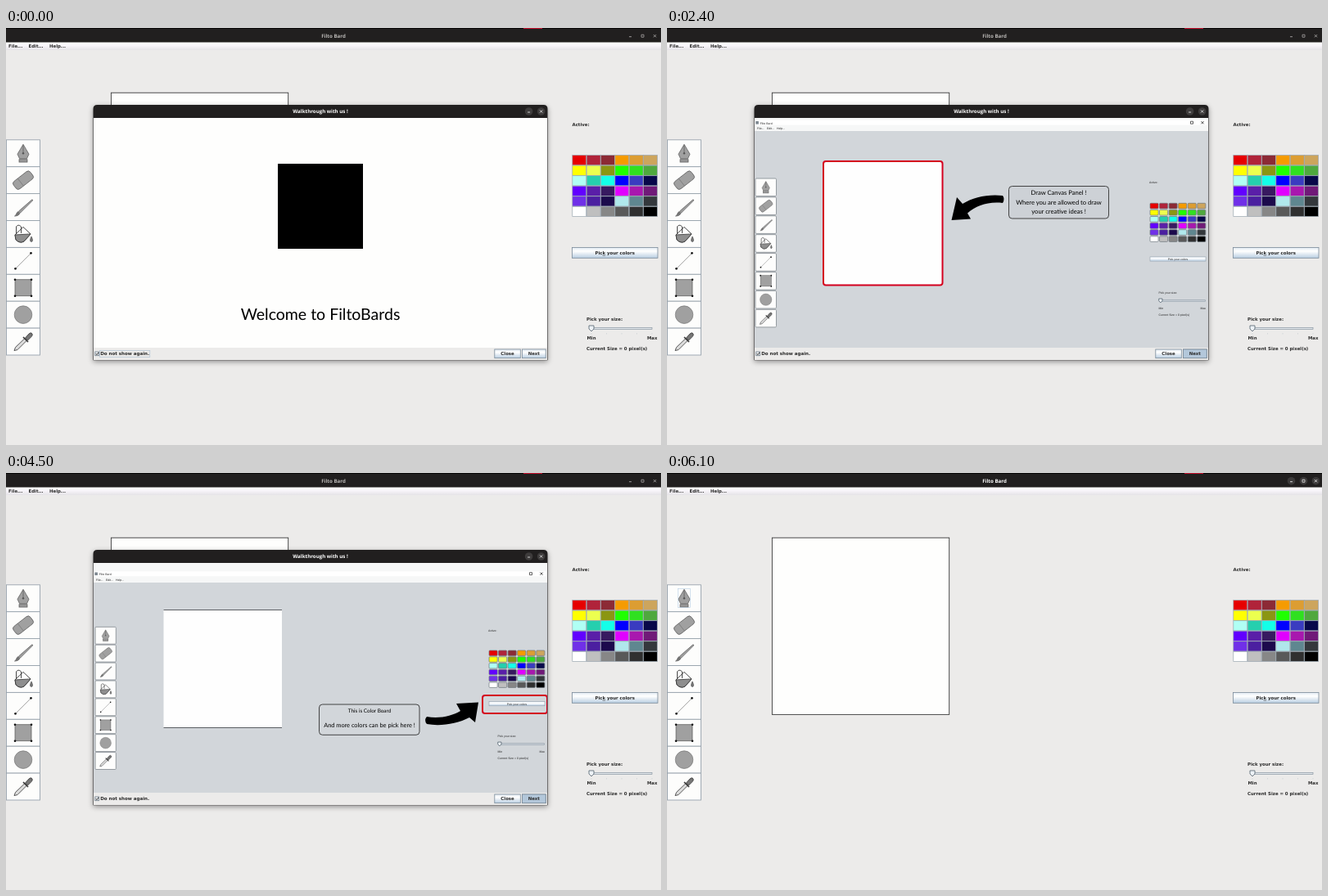
An HTML page for the animation above (7500 ms loop, 800x510 px).

```html
<!DOCTYPE html>
<html lang="en">
<head>
<meta charset="utf-8">
<title>Walkthrough</title>
<style>
html, body { margin: 0; width: 100%; height: 100%; overflow: hidden; background: #ecebea; }
svg { display: block; width: 800px; height: 510px; text-rendering: geometricPrecision; }
.ui { font: bold 5.4px "DejaVu Sans", sans-serif; fill: #2b2b2b; }
.bar { font: bold 6.15px "Open Sans", "Noto Sans", sans-serif; }
.small { font: 3.5px "Liberation Sans", Arial, sans-serif; fill: #222; }
.note { font: 7.6px Lato, sans-serif; fill: #000; text-anchor: middle; }
.big { font: 19.5px Lato, sans-serif; fill: #000; text-anchor: middle; }
.mid { text-anchor: middle; }
.mark { fill: none; stroke: #d4001e; stroke-width: 2; }

/* every part shares one 7.5 s clock */
.t { animation: 7.5s step-end infinite; }
.welcome { animation-name: welcome; }
.canvas { animation-name: canvas; }
.colors { animation-name: colors; }
.edit { animation-name: edit; }
.enjoy { animation-name: enjoy; }
.pressed { animation-name: pressed; }
.idle { animation-name: idle; }
.active { animation-name: active; }
#dialog { animation: close 7.5s linear infinite; transform-origin: 384px 250px; filter: drop-shadow(0 2px 3px rgba(0,0,0,.4)); }
@keyframes welcome { 0% { visibility: visible } 30.667%, 100% { visibility: hidden } }
@keyframes canvas { 0% { visibility: hidden } 30.667% { visibility: visible } 44%, 100% { visibility: hidden } }
@keyframes colors { 0% { visibility: hidden } 44% { visibility: visible } 64%, 100% { visibility: hidden } }
@keyframes edit { 0% { visibility: hidden } 64% { visibility: visible } 73.333%, 100% { visibility: hidden } }
@keyframes enjoy { 0% { visibility: hidden } 73.333%, 100% { visibility: visible } }
@keyframes pressed { 0% { visibility: hidden } 30.667% { visibility: visible } 64%, 100% { visibility: hidden } }
@keyframes idle { 0% { visibility: visible } 78.667%, 100% { visibility: hidden } }
@keyframes active { 0% { visibility: hidden } 78.667%, 100% { visibility: visible } }
@keyframes close {
  0%, 78.667% { transform: scale(1); opacity: 1; animation-timing-function: ease-out; }
  81.2%, 100% { transform: scale(.8); opacity: 0; }
}
</style>
</head>
<body>
<svg id="stage" viewBox="0 0 800 510"></svg>
<script>
const APP = 'Filto Bard';
const PALETTE = [
  'e60000 b0233a 8c2a35 f59b00 dc9d32 cda55d',
  'ffff00 ecff4f 8b9612 1fff00 30e020 4fa83e',
  'b0fff4 26cfae 14ffe8 0000ff 3a3cc0 08084a',
  '6200ff 5a1fa8 381a60 e000ff a818ae 701a78',
  '7030e8 4b1fa0 1c0a4c b0e8ec 5f8790 34383c',
  'ffffff bfbfbf 878787 595959 303030 000000'
].map(row => row.split(' '));

const rect = (x, y, w, h, fill, more = '') =>
  `<rect x="${x}" y="${y}" width="${w}" height="${h}" fill="${fill}" ${more}/>`;
const text = (x, y, str, cls = 'ui', more = '') =>
  `<text x="${x}" y="${y}" class="${cls}" ${more}>${str}</text>`;
const line = (d, stroke, w = 1) =>
  `<path d="${d}" fill="none" stroke="${stroke}" stroke-width="${w}"/>`;
const shape = (d, fill = '#000', more = '') => `<path d="${d}" fill="${fill}" ${more}/>`;
const timed = (name, body) => `<g class="t ${name}">${body}</g>`;
const dot = (x, y, r, fill = '#111') => `<circle cx="${x}" cy="${y}" r="${r}" fill="${fill}"/>`;
const box = 'stroke="#7a8a99" stroke-width=".8"';

// tool icons, drawn around their own centre
const ink = 'stroke="#555" stroke-width=".7"';
const ICONS = [
  shape('M0-11C2-7 5-3 7 1L4.5 6.500h-9L-7 1C-5-3-2-7 0-11Z', '#a0a0a0', ink) +
    rect(-5, 7.5, 10, 3.3, '#9a9a9a', ink) + line('M0-10V-1', '#555', .7) + dot(0, 0, 1.2, '#555'),
  `<g transform="rotate(-38)">${rect(-13, -5.8, 26, 11.6, '#a0a0a0', 'rx="3.5" ' + ink)}${line('M-4-5.800V5.800', '#777', .7)}</g>`,
  shape('M-10.500 11C-8 10-9 7-6 5.500L-4 7.500C-5 10-8 11-10.500 11Z', '#777', ink) +
    shape('M-5.500 5L10.500-9Q12-9.500 11.500-8L-3.500 7Z', '#a0a0a0', ink),
  shape('M-10 1L0-8.500L9 0L1 9Q-4 12-9 7Z', '#fff', 'stroke="#333" stroke-width=".9"') +
    shape('M-10 1L9 0L1 9Q-4 12-9 7Z', '#8e8e8e', 'stroke="#333" stroke-width=".8"') +
    line('M-8.500 0V-9Q-6-12.500-2.500-9V-1', '#333', .9) + shape('M10 3Q13 9 10 9.500Q7 9 10 3Z', '#777', ink),
  line('M-9.500 9.500L9.500-9.500', '#777', .7) + dot(-9.5, 9.5, 1.3) + dot(9.5, -9.5, 1.3),
  rect(-10, -10, 20, 20, '#a0a0a0', ink) +
    [[-10, -10], [10, -10], [-10, 10], [10, 10]].map(([x, y]) => dot(x, y, 1.3)).join(''),
  `<circle r="10.8" fill="#a0a0a0" stroke="#777" stroke-width=".7"/>`,
  shape('M-11 11L-9.500 7L2-4L4.500-1.500L-7 10Z', '#ddd', 'stroke="#333" stroke-width=".8"') +
    line('M0-5.500L6 .5', '#333', 1.6) +
    shape('M2.500-4.500L7-9.500Q9.500-12 11-9.500Q12-8 10-6L5.500-1.500Z', '#777', 'stroke="#333" stroke-width=".8"')
];

const tools = (x, y, w, h, gap, scale, stroke) => ICONS.map((icon, i) =>
  rect(x, y + i * h, w, h - gap, '#fdfdfc', `stroke="${stroke}" stroke-width=".9" rx="${gap}"`) +
  `<g transform="translate(${x + w / 2} ${y + i * h + (h - gap) / 2}) scale(${scale})">${icon}</g>`).join('');

const swatches = (x, y, dx, dy, gap, rx, stroke) => PALETTE.map((row, r) => row.map((c, i) =>
  rect(x + i * dx, y + r * dy, dx - gap, dy - gap, '#' + c, `rx="${rx}" stroke="${stroke}" stroke-width=".7"`)
).join('')).join('');

const slider = (x, y, w, s) =>
  rect(x, y - s, w, 2 * s, '#e4e8ec', 'stroke="#8795a2" stroke-width=".7"') +
  shape(`M${x - 2.5 * s} ${y - 3.5 * s}h${6 * s}v${4 * s}l${-3 * s} ${3 * s}l${-3 * s} ${-3 * s}Z`,
    '#edf2f6', 'stroke="#51606d" stroke-width=".8"');

const button = (x, y, w, h, label, cls = 'ui') =>
  rect(x, y, w, h, 'url(#metal)', box) + text(x + w / 2, y + h / 2 + 2, label, cls + ' mid');

const winButtons = (xs, y, color, disc) => xs.map(([x, kind]) =>
  (disc ? dot(x, y, 4.8, disc) : '') + {
    min: line(`M${x - 1.5} ${y + 1}h3`, color, .8),
    max: line(`M${x - 1.5} ${y - 1.5}h3v3h-3Z`, color, .7),
    x: line(`M${x - 1.6} ${y - 1.6}l3.2 3.2m0-3.2l-3.2 3.2`, color, .8)
  }[kind]).join('');

function mainWindow() {
  const buttons = [[762.5, 'min'], [777.5, 'max'], [792.5, 'x']];
  const title = (color, disc) =>
    text(400, 12, APP, 'bar mid', `fill="${color}"`) + winButtons(buttons, 9.7, color, disc);
  return rect(0, 0, 800, 510, '#ecebea') +
    rect(0, 0, 800, 17.7, '#211f1f') + rect(0, 0, 800, 1, '#060606') + rect(632, 0, 23, 1, '#c8102e') +
    timed('idle', title('#b9b7b5', '')) + timed('active', title('#fff', '#3c3a3a')) +
    rect(0, 17.7, 800, 9.3, 'url(#menu)') +
    text(3, 23.8, 'File...') + text(27.5, 23.8, 'Edit...') + text(53, 23.8, 'Help...') +
    rect(128.4, 79.2, 216.3, 216.2, '#fefefd', 'stroke="#3a3a3a" stroke-width=".9"') +
    tools(.5, 136.8, 41, 32.9, 0, 1, '#98a3ad') +
    timed('active', rect(13.5, 141.5, 15, 23, 'none', 'stroke="#b8cfe5" stroke-width=".6"')) +
    text(691.5, 119.5, 'Active:') +
    swatches(691.8, 155.6, 17.35, 12.55, .4, 0, '#9aa6b0') +
    button(691.5, 268.5, 104.5, 12.8, 'Pic<tspan text-decoration="underline">k</tspan> your colors') +
    text(709, 357.5, 'Pick your size:') + slider(714.5, 367.5, 74.5, 1) +
    line('M715 373v1.500m18.500-1.500v1.500m18.500-1.500v1.500m18.500-1.500v1.500m18.500-1.500v1.500', '#c3c9ce', .6) +
    text(709.5, 381.2, 'Min') + text(783, 381.2, 'Max') +
    text(709, 394, 'Current Size = 0 pixel(s)');
}

// small picture of the program used inside the walkthrough pages
function mini(o) {
  return rect(107, 110, 554, 281, o.bg) +
    rect(107, 110, 554, o.head, '#f6f7f7') + rect(107, o.top - 3, 554, 6, '#fff') +
    rect(108.3, o.top - 1.7, 3.6, 3.6, '#7d8790') +
    text(113.7, o.top + 1.8, APP, 'small') +
    ['File...', 'Edit...', 'Help...'].map((m, i) => text(110 + 12 * i, o.top + 8.6, m, 'small')).join('') +
    winButtons(o.buttons, o.top, '#222') +
    rect(...o.paper, '#fefefe') +
    tools(...o.tools) + swatches(...o.palette) +
    text(589, o.active, 'Active:', 'small') +
    rect(590, o.pick - 2.6, 68, 5.2, 'url(#metal)', 'stroke="#8a98a5" stroke-width=".5"') +
    text(624, o.pick + 1.3, 'Pick your colors', 'small mid') +
    text(600.5, o.size, 'Pick your size:', 'small') + slider(602.5, o.size + 8.5, 55, .7) +
    text(600.5, o.size + 18.5, 'Min', 'small') + text(651.5, o.size + 18.5, 'Max', 'small') +
    text(600.5, o.size + 27, 'Current Size = 0 pixel(s)', 'small');
}

const callout = (x, y, w, h, fill) =>
  rect(x, y, w, h, fill, 'rx="4" stroke="#333" stroke-width=".9"');
const note = (x, y, str, size = 7.6) => text(x, y, str, 'note', `style="font-size:${size}px"`);
const redBox = (x, y, w, h) => `<rect class="mark" x="${x}" y="${y}" width="${w}" height="${h}" rx="3"/>`;
const cover = str => rect(107, 110, 554, 281, '#fefefd') +
  rect(332, 166, 104, 104, '#000') + text(384, 356.7, str, 'big');

const canvasPage = () => mini({
  bg: '#d2d6da', head: 16, top: 115.7, buttons: [[641, 'max'], [654, 'x']],
  paper: [191, 163, 146, 152], tools: [108, 184, 25.5, 22.9, 1.3, .66, '#8c9298'],
  palette: [590, 214.3, 11.55, 8.1, 1.5, 1, '#6e767d'], active: 189.5, pick: 282.5, size: 325
}) + redBox(191, 163, 145.5, 151.5) +
  callout(417.5, 193.5, 122, 39.5, '#cdd1d6') +
  note(478.5, 203.5, 'Draw Canvas Panel !') + note(478.5, 216, 'Where you are allowed to draw') +
  note(478.5, 227, 'your creative ideas !') +
  shape('M410 205C392 203 374 207 361 215L354 207L347.500 235L371 233.500L367 226.500C378 217 392 212 410 214Q413 209 410 205Z');

const colorPage = () => mini({
  bg: '#d2d6da', head: 24, top: 123.2, buttons: [[641, 'max'], [654, 'x']],
  paper: [192.5, 167, 144.5, 144.5], tools: [109, 188.3, 25.3, 21.9, 1, .63, '#8c9298'],
  palette: [590, 217, 11.55, 7.8, 1.4, 1, '#6e767d'], active: 193.5, pick: 282.2, size: 323
}) + line('M192.500 167.500h144.500M192.500 311.500h144.500', '#4b4f53', .9) +
  redBox(582, 272, 79, 22) + callout(382.5, 283, 122.5, 37.3, '#d2d6da') +
  note(444, 293.3, 'This is Color Board', 6.4) + note(444, 311.2, 'And more colors can be pick here !', 7.4) +
  shape('M514 298C529 301 545 297 555 291L550 282L577 280.500L573 305L566 299C551 307 530 310 514 307Q510 302 514 298Z');

const editPage = () => mini({
  bg: '#ebebea', head: 14, top: 115.2, buttons: [[628, 'min'], [641, 'max'], [654, 'x']],
  paper: [192, 163, 144, 150], tools: [107.3, 183.7, 26.5, 22.85, 0, .66, '#b4bac0'],
  palette: [589.2, 213.3, 11.55, 8.5, .4, 0, '#87919a'], active: 190, pick: 283.8, size: 326
}) + line('M336 163v150', '#333', 1) +
  rect(118.5, 119, 50, 47, '#e9eaec') + rect(119.5, 119.5, 11.5, 5.8, '#a9bfd5') +
  text(120.5, 124, 'Edit...', 'small') + text(133.5, 124, 'Help...', 'small') +
  [['Undo', 'Ctrl-Z'], ['Redo', 'C-S-Z'], ['Flip Horizontally', 'Ctrl-H'],
   ['Flip Vertically', 'Ctrl-V'], ['Rotate Left', 'Ctrl-L'], ['Rotate Right', 'Ctrl-R']]
    .map(([name, key], i) => text(121, 130.6 + 6.4 * i, name, 'small', 'font-weight="bold"') +
      text(148, 130.6 + 6.4 * i, key, 'small', 'style="fill:#6670a8"')).join('') +
  redBox(118, 118.7, 50.5, 47.3) + callout(219, 194.8, 115, 39.3, '#fefefe') +
  note(261, 205, 'Naviagate Menu !', 8.1) + note(308.5, 204.7, '(Edit Tab)', 6.7) +
  note(276.5, 216.2, 'You can modify your canvas by', 8) +
  note(276.5, 228.2, 'flip, rotate, undo-redo ...', 8) +
  shape('M214 206C198 205 185 198 177 187L184 181L159 172L155.500 198L165 193.500C175 208 196 216 214 214Q217 210 214 206Z');

function dialog() {
  const next = (fill) => rect(630.5, 393, 28.7, 10.7, fill, box) + text(644.8, 400.4, 'Next', 'ui mid');
  return `<g id="dialog">` +
    shape('M106.500 406.300V99Q106.500 94 111.500 94H656.500Q661.500 94 661.500 99V406.300Z', '#211f1f') +
    text(384, 104.2, 'Walkthrough with us !', 'bar mid', 'fill="#fff"') +
    winButtons([[638.6, 'min'], [653.6, 'x']], 102, '#f4f4f4', '#3e3c3c') +
    rect(107, 110, 554, 296, '#ecebea') +
    `<g clip-path="url(#page)">` +
    timed('welcome', cover('Welcome to FiltoBards')) + timed('canvas', canvasPage()) +
    timed('colors', colorPage()) + timed('edit', editPage()) +
    timed('enjoy', cover('Enjoy making your drawings!')) + `</g>` +
    rect(108.8, 396, 4.7, 4.7, '#f4f7fa', 'stroke="#697784" stroke-width=".8"') +
    line('M109.800 398.200l1.200 1.500l2-3', '#222', .9) +
    timed('welcome', rect(114.5, 394.5, 61.3, 8, 'none', 'stroke="#b3c4d4" stroke-width=".7"')) +
    text(115.2, 400.4, 'Do not show again.', 'ui', 'style="font-size:5.52px"') +
    button(596.8, 393, 31.5, 10.7, 'Close') + next('url(#metal)') + timed('pressed', next('#b3c7da')) +
    timed('edit', rect(636, 395.2, 17.5, 6.6, 'none', 'stroke="#a3b8cc" stroke-width=".6"')) +
    `</g>`;
}

document.getElementById('stage').innerHTML = `<defs>
  <linearGradient id="metal" x2="0" y2="1"><stop stop-color="#e3ecf4"/><stop offset=".35" stop-color="#fff"/><stop offset="1" stop-color="#b9cee2"/></linearGradient>
  <linearGradient id="menu" x2="0" y2="1"><stop stop-color="#fff"/><stop offset=".4" stop-color="#f8f5fa"/><stop offset="1" stop-color="#e5e3e7"/></linearGradient>
  <clipPath id="page"><rect x="107" y="110" width="554" height="281"/></clipPath>
</defs>` + mainWindow() + dialog();
</script>
</body>
</html>
```
